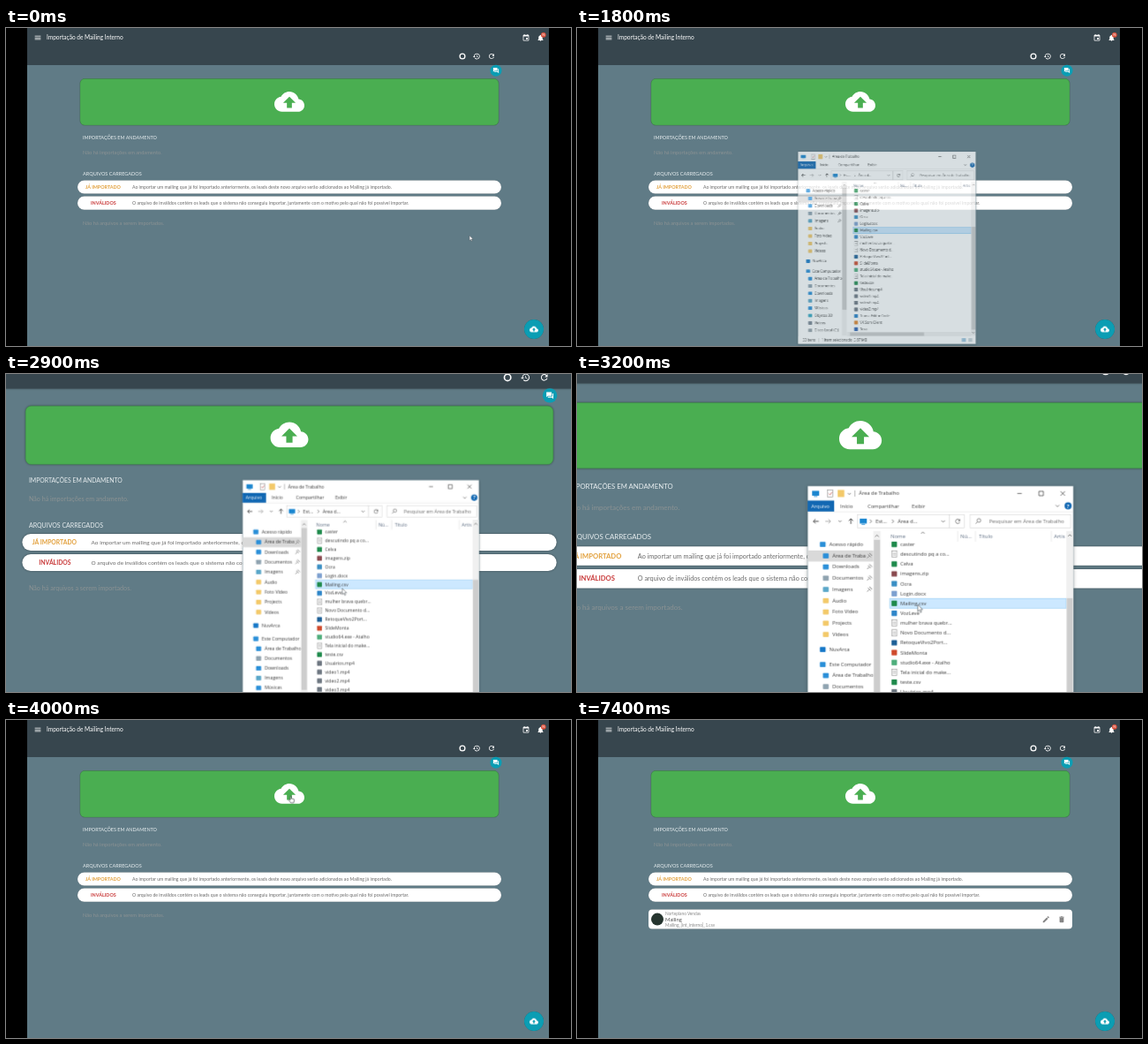
Write an HTML page that moves like this. It is 640x360 px and loops after 8400 ms.

```html
<!DOCTYPE html>
<html lang="pt">
<head>
<meta charset="utf-8">
<title>Importação de Mailing</title>
<style>
html, body { margin: 0; width: 100%; height: 100%; overflow: hidden; background: #000; }
svg { display: block; width: 640px; height: 360px; font-family: Lato, sans-serif; }
#win { font-family: "Open Sans", sans-serif; }
.lift { filter: drop-shadow(0 .6px .7px #0006); }
</style>
</head>
<body>
<svg id="stage" viewBox="0 0 640 360"></svg>
<script>
const LOOP = 8400;
const TEAL = '#0b9db3', PAGE = '#607b86', HEAD = '#37464e';

const icons = {
  cloud: 'M19.35 10.04C18.67 6.59 15.64 4 12 4 9.11 4 6.6 5.64 5.35 8.04 2.34 8.36 0 10.91 0 14c0 3.31 2.69 6 6 6h13c2.76 0 5-2.24 5-5 0-2.64-2.05-4.78-4.65-4.96zM14 13v4h-4v-4H7l5-5 5 5h-3z',
  menu: 'M3 18h18v-2H3v2zm0-5h18v-2H3v2zm0-7v2h18V6H3z',
  refresh: 'M17.65 6.35C16.2 4.9 14.21 4 12 4c-4.42 0-7.99 3.58-7.99 8s3.57 8 7.99 8c3.73 0 6.84-2.55 7.73-6h-2.08c-.82 2.33-3.04 4-5.65 4-3.31 0-6-2.69-6-6s2.69-6 6-6c1.66 0 3.14.69 4.22 1.78L13 11h7V4l-2.35 2.35z',
  history: 'M13 3c-4.97 0-9 4.03-9 9H1l3.89 3.89.07.14L9 12H6c0-3.87 3.13-7 7-7s7 3.13 7 7-3.13 7-7 7c-1.93 0-3.68-.79-4.94-2.06l-1.42 1.42C8.27 19.99 10.51 21 13 21c4.97 0 9-4.03 9-9s-4.03-9-9-9zm-1 5v5l4.28 2.54.72-1.21-3.5-2.08V8H12z',
  event: 'M17 12h-5v5h5v-5zM16 1v2H8V1H6v2H5c-1.11 0-1.99.9-1.99 2L3 19c0 1.1.89 2 2 2h14c1.1 0 2-.9 2-2V5c0-1.1-.9-2-2-2h-1V1h-2zm3 18H5V8h14v11z',
  bell: 'M12 22c1.1 0 2-.9 2-2h-4c0 1.1.89 2 2 2zm6-6v-5c0-3.07-1.64-5.64-4.5-6.32V4c0-.83-.67-1.5-1.5-1.5s-1.5.67-1.5 1.5v.68C7.63 5.36 6 7.92 6 11v5l-2 2v1h16v-1l-2-2z',
  forum: 'M21 6h-2v9H6v2c0 .55.45 1 1 1h11l4 4V7c0-.55-.45-1-1-1zm-4 6V3c0-.55-.45-1-1-1H3c-.55 0-1 .45-1 1v14l4-4h10c.55 0 1-.45 1-1z',
  edit: 'M3 17.25V21h3.75L17.81 9.94l-3.75-3.75L3 17.25zM20.71 7.04a1 1 0 0 0 0-1.41l-2.34-2.34a1 1 0 0 0-1.41 0l-1.83 1.83 3.75 3.75 1.83-1.83z',
  bin: 'M6 19c0 1.1.9 2 2 2h8c1.1 0 2-.9 2-2V7H6v12zM19 4h-3.5l-1-1h-5l-1 1H5v2h14V4z'
};

// drawing helpers; text and icons are placed by their vertical centre
const rect = (x, y, w, h, fill, more = '') =>
  `<rect x="${x}" y="${y}" width="${w}" height="${h}" fill="${fill}" ${more}/>`;
const disc = (x, y, r, fill, more = '') => `<circle cx="${x}" cy="${y}" r="${r}" fill="${fill}" ${more}/>`;
const text = (x, y, size, fill, str, more = '') =>
  `<text x="${x}" y="${y + size * .34}" font-size="${size}" fill="${fill}" ${more}>${str}</text>`;
const icon = (name, cx, cy, size, fill = '#fff') =>
  `<path d="${icons[name]}" fill="${fill}" transform="translate(${cx - size / 2} ${cy - size / 2}) scale(${size / 24})"/>`;
const line = (d, color = '#555', w = .7) => `<path d="${d}" fill="none" stroke="${color}" stroke-width="${w}"/>`;

function page() {
  const grey = '#8b9293', body = '#686868';
  const pill = (y, color, x, label, str) =>
    rect(81, y - 7.6, 480, 15.2, '#fff', 'rx="7.6" class="lift"') +
    text(x, y, 5.4, color, label, 'font-weight="700"') + text(143, y, 5.13, body, str);
  return rect(24, 0, 591, 360, PAGE) +
    rect(24, 0, 591, 42, HEAD, 'class="lift"') +
    icon('menu', 36, 11, 9) + text(46, 11, 6.55, '#fff', 'Importação de Mailing Interno') +
    icon('event', 589, 11, 9) + icon('bell', 605.5, 11.3, 9) +
    disc(608.8, 7.8, 2.9, '#d9503c') + text(608.8, 7.8, 3, '#fff', '94', 'text-anchor="middle"') +
    disc(517, 32, 2.9, 'none', 'stroke="#fff" stroke-width="1.3"') +
    icon('history', 533, 32, 9) + icon('refresh', 550, 32, 9) +
    `<clipPath id="track">${rect(24, 40.6, 591, 2, '#000')}</clipPath>` +
    `<g id="load" clip-path="url(#track)">${rect(0, 40, 0, 3, '#00acc1', 'id="long"')}${rect(0, 40, 0, 3, '#00acc1', 'id="short"')}</g>` +
    disc(555, 48.2, 6.5, TEAL) + icon('forum', 555, 48.2, 7.5) +
    rect(84, 57.6, 474, 52.4, '#4aae51', 'rx="5" stroke="#3f8747" stroke-width=".4" class="lift"') +
    icon('cloud', 321, 83.4, 34) +
    text(87, 124.4, 5.45, '#e8eef0', 'IMPORTAÇÕES EM ANDAMENTO') +
    text(87, 141.2, 5.67, grey, 'Não há importações em andamento.') +
    text(87, 164.9, 5.55, '#e8eef0', 'ARQUIVOS CARREGADOS') +
    pill(180, '#e2a03c', 90, 'JÁ IMPORTADO', 'Ao importar um mailing que já foi importado anteriormente, os leads deste novo arquivo serão adicionados ao Mailing já importado.') +
    pill(198.2, '#c93a3a', 96, 'INVÁLIDOS', 'O arquivo de inválidos contém os leads que o sistema não conseguiu importar, juntamente com o motivo pelo qual não foi possível importar.') +
    `<g id="empty">${text(87, 221.3, 5.68, grey, 'Não há arquivos a serem importados.')}</g>` +
    `<g id="file">${rect(81, 214.5, 480, 22, '#fff', 'rx="4" class="lift"')}` +
    disc(91, 225.6, 7, '#26352f') +
    text(100, 219.6, 4.8, '#888', 'Norteplano Vendas') + text(100, 225.8, 5.9, '#555', 'Mailing') +
    text(100, 232.2, 4.8, '#888', 'Mailing_[int_interno]_1.csv') +
    icon('edit', 531.3, 225.8, 9.5, '#858585') + icon('bin', 549, 225.8, 9.5, '#858585') + '</g>' +
    disc(598, 341, 11, TEAL, 'class="lift"') + icon('cloud', 598, 341, 10);
}

const BLUE = '#2a8fd8', GREEN = '#1f8a4c', FOLDER = '#f3c969';
const places = [
  ['Acesso rápido', BLUE, 66, 0], ['Área de Traba', BLUE, 79, 1, 1], ['Downloads', BLUE, 91.5, 1, 1],
  ['Documentos', '#8fa3b0', 104.3, 1, 1], ['Imagens', '#5aa7c9', 117, 1, 1], ['Áudio', FOLDER, 129.8, 1],
  ['Foto Vídeo', FOLDER, 142.5, 1], ['Projects', FOLDER, 155.3, 1], ['Vídeos', FOLDER, 168, 1],
  ['NuvArca', '#1678c8', 185, 0], ['Este Computador', BLUE, 202, 0], ['Área de Trabalho', BLUE, 214.5, 1],
  ['Documentos', '#8fa3b0', 227, 1], ['Downloads', BLUE, 239.5, 1], ['Imagens', '#5aa7c9', 252, 1],
  ['Músicas', BLUE, 264.5, 1], ['Objetos 3D', '#35a9c4', 277, 1], ['Vídeos', '#7b8794', 289.5, 1],
  ['Disco Local (C:)', '#9aa4ab', 302, 1]
];
const files = [
  ['caster', GREEN], ['descutindo pq a co...'], ['Celva', GREEN], ['imagens.zip', '#8a4a4f'], ['Ocra', '#3a8fc4'],
  ['Login.docx', '#7da0d0'], ['Mailing.csv', GREEN], ['VozLeve', '#2f86c9'], ['mulher brava quebr...'],
  ['Novo Documento d...'], ['RetoqueVivo2Port...', '#1d5f96'], ['SlideMonta', '#cf4a2c'],
  ['studio64.exe - Atalho', '#4fae7c'], ['Tela inicial do make...'], ['teste.csv', GREEN],
  ['Usuários.mp4', '#6d7680'], ['video1.mp4', '#6d7680'], ['video2.mp4', '#6d7680'], ['video3.mp4', '#6d7680'],
  ['Trama Editor Code', '#2580c8'], ['VX Som Client', '#e0852c'], ['Texa', '#2b5fb0']
];
const rowY = i => 66 + 11.14 * i;

function explorer() {
  const ink = '#3a3a3a', soft = '#6b6b6b', F = 5.9;
  const monitor = (x, y) => rect(x - 4, y - 3, 8, 5.5, '#1a86d0') + rect(x - 2, y + 3, 4, .8, '#1a86d0');
  let s = rect(0, 0, 301, 325, '#fff', 'stroke="#6f8893" stroke-width=".5" style="filter:drop-shadow(0 1px 2px #0004)"');
  // title bar and tabs
  s += monitor(9, 8.5) + rect(22.5, 4.5, 6, 8, '#fff', 'stroke="#888" stroke-width=".6"') +
    line('M24 8.5l1.4 1.6 2.4-3.4', '#c0504d') + rect(34, 4.5, 7.5, 8, FOLDER) +
    line('M45.5 8l1.7 1.7 1.7-1.7') + line('M53.5 5v7', '#999') + text(58, 8.5, F - .1, ink, 'Área de Trabalho') +
    line('M237.5 8.5h5M262 6h5v5h-5zM286.5 6l5 5m0-5l-5 5', ink);
  s += rect(0, 16.5, 30, 12.5, '#1268b3') + text(4, 22.7, F - .1, '#fff', 'Arquivo') +
    text(37, 22.7, F - .1, ink, 'Início') + text(68, 22.7, F - .1, ink, 'Compartilhar') +
    text(118, 22.7, F - .1, ink, 'Exibir') + line('M281 21.5l2 2 2-2') +
    disc(295, 22.5, 4, '#1268b3') + text(295, 22.5, 6, '#fff', '?', 'text-anchor="middle" font-weight="700"') +
    line('M0 29.3h301', '#ddd', .5);
  // address row
  s += line('M12.5 40h-6m2.4-2.4L6.5 40l2.4 2.4', ink, .9) + line('M20 40h6m-2.4-2.4L26 40l-2.4 2.4', '#aaa', .9) +
    line('M35 39l1.7 1.7 1.7-1.7') + line('M49 43v-6m-2.4 2.4L49 37l2.4 2.4', ink, .9) +
    rect(56.5, 32.5, 104, 15, '#fff', 'stroke="#d5d5d5" stroke-width=".6"') +
    rect(160.5, 32.5, 17, 15, '#fff', 'stroke="#d5d5d5" stroke-width=".6"') + monitor(63, 40) +
    line('M70.5 38l2 2-2 2M95.5 38l2 2-2 2M151.5 39l2 2 2-2') +
    text(77, 40, F, ink, 'Est...') + text(102, 40, F, ink, 'Área d...') + icon('refresh', 170, 40, 8, soft) +
    rect(184, 32.5, 114, 15, '#fff', 'stroke="#d5d5d5" stroke-width=".6"') +
    disc(194, 39, 2.1, 'none', 'stroke="#666" stroke-width=".7"') + line('M192.4 40.6l-2 2') +
    text(205.5, 40, F, soft, 'Pesquisar em Área de Trabalho');
  // side bar
  s += rect(0, 73, 75, 12.5, '#d9d9d9');
  for (const [name, color, y, level, pin] of places) {
    const x = 17 + 3.5 * level;
    s += rect(x - 3.2, y - 2.8, 6.5, 5.8, color, 'rx=".8"') + text(x + 7.5, y, F, ink, name);
    if (pin) s += line(`M67.5 ${y + 2.5}l2-2m-1-2l3 3m-1.5-4.5l3 3`, '#777', .9);
  }
  s += rect(74.5, 51, 8, 260, '#f0f0f0') + rect(75, 61, 7, 206, '#cdcdcd') + line('M76.5 57.5l2-2 2 2');
  // file list
  s += text(94, 57.5, F, '#5b6b80', 'Nome') + text(173, 57.5, F, '#5b6b80', 'Nú...') +
    text(194, 57.5, F, '#5b6b80', 'Título') + text(279, 57.5, F, '#5b6b80', 'Artis') +
    line('M128.5 54l2-2 2 2') + line('M170 51v12M190 51v12M276 51v12', '#ddd', .6) +
    rect(93, rowY(6) - 5.5, 200, 11, '#cce8ff', 'stroke="#93cdf5" stroke-width=".6"') +
    `<g id="hover">${rect(93, rowY(7) - 5.3, 200, 11, '#e5f3ff')}</g>`;
  files.forEach(([name, color], i) => {
    const y = rowY(i);
    s += (color ? rect(95, y - 3, 6.2, 6.2, color, 'rx=".7"')
      : rect(95.5, y - 3.5, 5.5, 7, '#fff', 'stroke="#888" stroke-width=".6"') + line(`M96.5 ${y - 1}h3.5m-3.5 2h3.5`, '#888', .6)) +
      text(105, y, F - .1, ink, name);
  });
  s += rect(293, 51, 7.6, 260, '#f0f0f0') + rect(293.5, 127, 6.6, 174, '#cdcdcd') + line('M295 57l2-2 2 2M295 305l2 2 2-2') +
    rect(83, 305, 210, 7, '#f0f0f0') + rect(88, 305.5, 125, 6, '#cdcdcd') +
    rect(.4, 312, 300.2, 12.6, '#fff') + text(8, 318.5, F, ink, '33 itens') + line('M35 315v7', '#ccc', .6) +
    text(40, 318.5, F, ink, '1 item selecionado&#160; 3,87 MB') +
    rect(277, 315.5, 7, 6, '#9cc4de') + rect(288, 315.5, 7, 6, '#c9d4da');
  return s;
}

const pointers =
  '<path id="arrow" d="M0 0V10L2.4 7.8 4 11.4 5.6 10.7 4 7.2H7.2z" fill="#fff" stroke="#4a5257" stroke-width=".8" transform="scale(.55)"/>' +
  '<path id="hand" d="M3 7V1.2a1 1 0 0 1 2 0V4.5l4.2.9a1 1 0 0 1 .8 1V9L9 12H4L.6 7.8a1 1 0 0 1 1.4-1.2z" fill="#fff" stroke="#20282c" stroke-width=".9" transform="translate(-2.5 0) scale(.64)"/>';

document.getElementById('stage').innerHTML =
  `<g id="cam">${page()}<g id="win">${explorer()}</g><g id="cursor">${pointers}</g></g>`;

// steps: [ms, properties, easing towards the next step]
function play(id, steps) {
  const keys = steps.map(([ms, props, easing = 'linear']) => ({ ...props, easing, offset: ms / LOOP }));
  if (keys[0].offset > 0) keys.unshift({ ...keys[0], offset: 0, easing: 'step-end' });
  if (keys[keys.length - 1].offset < 1) keys.push({ ...keys[keys.length - 1], offset: 1 });
  document.getElementById(id).animate(keys, { duration: LOOP, iterations: Infinity });
}
const place = (x, y, s = 1) => ({ transform: `translate(${x}px, ${y}px) scale(${s})` });
const flip = (id, ...steps) => play(id, steps.map(([ms, on]) => [ms, { opacity: on }, 'step-end']));
const span = (x, width) => ({ x: x + 'px', width: width + 'px' });

play('cam', [
  [2400, place(0, 0)], [2700, place(-50.1, -28, 1.156)], [3200, place(-133.8, -49, 1.417)],
  [3400, place(-133.8, -49, 1.417), 'ease-in-out'], [3850, place(0, 0)]
]);
play('win', [
  [1700, { ...place(236, 160, .64), opacity: 0 }],
  [1800, { ...place(250, 140.2, .669), opacity: .75 }, 'ease-out'],
  [1950, { ...place(278.8, 124, .7057), opacity: 1 }],
  [3650, { ...place(278.8, 124, .7057), opacity: 1 }, 'ease-in'],
  [3850, { ...place(240, 160, .64), opacity: 0 }]
]);
play('cursor', [
  [0, 525, 235], [100, 525, 235], [320, 330, 328], [540, 57, 200], [720, 170, 120], [900, 323, 78],
  [1000, 330, 78], [1100, 334, 78], [1250, 334, 78], [1400, 320, 75], [1550, 320, 75],
  [1750, 290, 364], [1950, 290, 364], [2350, 366, 240], [2700, 370.2, 224], [3100, 366.8, 218.8],
  [3250, 366.8, 218.8], [3600, 322.5, 86], [6750, 322.5, 86], [7000, 260, 220], [7300, 190, 366]
].map(([ms, x, y]) => [ms, place(x, y), 'ease-in-out']));
flip('arrow', [0, 1], [780, 0], [1600, 1], [3570, 0], [6830, 1]);
flip('hand', [0, 0], [780, 1], [1600, 0], [3570, 1], [6830, 0]);
flip('hover', [0, 0], [2600, 1], [2900, 0]);
flip('file', [0, 0], [6500, 1]);
flip('empty', [0, 1], [6500, 0]);

// indeterminate loading bar, one long and one short sweep
flip('load', [0, 0], [4050, 1], [6150, 0]);
play('long', [[4050, span(-182.9, 206.9), 'cubic-bezier(.65,.815,.735,.395)'], [5310, span(615, 531.9)]]);
play('short', [[5200, span(-1158, 1182), 'cubic-bezier(.165,.84,.44,1)'], [6460, span(656.4, 5.9)]]);
</script>
</body>
</html>
```
